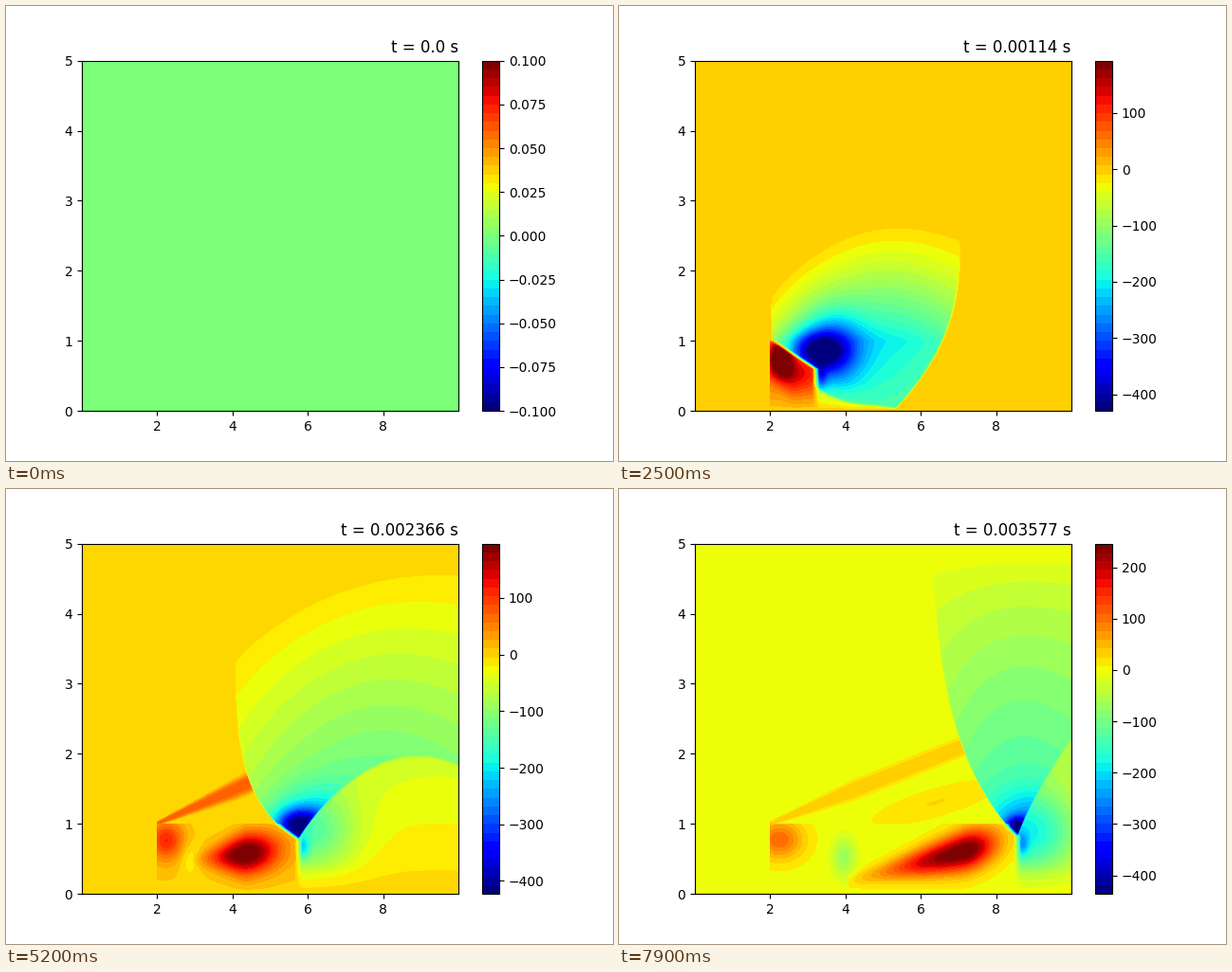
Animation, 640 px wide and 480 px high, one loop 8 s. Source, as a matplotlib script:

```python
import numpy as np
import matplotlib.pyplot as plt
from matplotlib.animation import FuncAnimation

FRAMES = 80
BANDS = 40
START = .327  # ms, the shock reaches the step
STEP_X = 2

# Simulation clock (ms) and colour limits at a few moments
MOMENT = [0, 8, 19, 32, 42, 52, 68, 79]
CLOCK = [0, .365, .868, 1.457, 1.912, 2.366, 3.085, 3.577]
LOW = [-350, -350, -438, -420, -502, -423, -388, -436]
HIGH = [10, 10, 103, 298, 345, 196, 215, 246]

x = (.01 + 9.98 * (np.arange(397) + .5) / 397)[None, :]
y = (5 * (np.arange(370) + .5) / 370)[:, None]


def ramp(q, a=0, b=1):
    """Rise from 0 at a to 1 at b."""
    return np.clip((q - a) / (b - a), 0, 1)


def pulse(q, centre, width):
    return np.exp(-((q - centre) / width) ** 2)


def gauss(cx, cy, sx, sy, amp):
    return amp * pulse(x, cx, sx) * pulse(y, cy, sy)


def vortex(t):
    age = t - START
    tx = max(2 + 1.5 * age, 4.7 + 2.32 * (t - 1.912))
    ty = .82 - .32 * pulse(t, 1.5, .6)
    return tx, ty


def trailing_edge(t, tx, ty):
    """Left end of the expansion: its x high up, and its x for every y."""
    far = max(2, 1.75 * t - .1)
    near = max(2, 2.88 + 2.53 * (t - 1.457))
    reach = .6 + .65 * max(0, t - 2.366)
    upper = far + (near - far) * np.exp(-np.maximum(y - 1, 0) / reach)
    lower = np.interp(y, [ty, 1], [tx, near])
    return far, np.where(y > 1, upper, lower)


def expansion(t, left, right):
    """Downward flow that grows from the arched top towards the step level."""
    age = t - START
    u = ramp(x, left, max(right, left + .05))
    rim = np.clip(1.5 * t - .05, 1, 4.7)
    peak = max(rim, min(4.8, 1 + 2.3 * age - .23 * age ** 2))
    turn = max(1.6, 2.7 - .5 * t)
    top = rim + (peak - rim) * np.sin(turn * u ** .8)
    depth = np.clip((top - y) / np.maximum(top - 1, .05), 0, 1)
    swell = 35 + 90 * np.exp(-(t - .868) / .8)
    amp = 75 + 60 * u + swell * np.sin(np.pi * u)
    return -amp * depth ** (1.45 - .2 * t) * np.minimum(1, .75 + .25 * y)


def reflection(t, tx, ty):
    """Height of the wave thrown back by the ground."""
    w = ramp(x, tx, max(tx + .1, 7.55 + 6.5 * (t - 1.457)))
    peak = .7 + 1.45 * (t - 1.457)
    arc = ty * (1 - w ** 3) + (peak - ty) * np.sin(np.pi * w ** .85)
    return np.maximum(arc * ramp(t, .85, 1.35), .02), w


def ahead(t, low, tx, ty, left):
    age = t - START
    shock = 2 + 6.25 * age
    core_w = min(.9 * age, .75 - .22 * (t - 1.457))
    halo = gauss(tx + .4, .85, min(age, 1.1), min(.9 * age, .55), -150)
    halo = halo * ramp(y, 0, .4)
    size = min(.3 * age, .17)
    blob = gauss(tx + .12, ty - .12, size, size, -90)
    core = gauss(tx, ty + .07 + .25 * core_w, core_w, .3 * core_w + .05, low / 2)

    upper = expansion(t, left, min(shock, 9.99)) + halo + core
    arc, w = reflection(t, tx, ty)
    lower = halo * ramp(t, 1, 3) - 55 * (1 - .4 * w) * np.minimum(y / arc, 1)
    under = ramp(arc - y, -.02, .02) * (x > tx - .1)
    v = upper * (1 - under) + lower * under + blob

    bend = (2.1 - .4 * age) * np.clip(1 - y / (1 + 1.8 * age), 0, 1) ** 2.5
    return v * ramp(shock - bend - x, 0, .07) * ramp(y, 0, .05)


def base_flow(t, high, tx):
    """Recirculation and hot wake below the step level."""
    cx, cy = max(2.6, tx - 1.4), .5 + .03 * t
    x0 = max(2, 2.6 + .9 * (t - 1.95))
    span = max(.4, .65 * (cx - x0))
    tilt = .14 * ramp(t, 1.9, 2.9)
    thick = .29 * (.35 + .65 * ramp(x, x0, cx))
    wake = (1.1 * high * ramp(t, .9, 1.4) * ramp(x, x0 - .05, x0 + .05)
            * pulse(x, cx, np.where(x < cx, span, .85))
            * pulse(y, cy + tilt * (x - cx), thick))
    fill = 80 * pulse(t, 1.5, .6) - 150 * pulse(t, .6, .35)
    corner = (110 + 120 * pulse(t, 1.2, .4)) * ramp(t, START, START + .5)
    v = (wake + fill * 4 * y * (1 - y)
         + gauss(2.25, .77, .2 + .12 * t, .28, corner)
         + gauss(x0 - .1, .52, .3, .27, -70 * ramp(t, 2, 2.8)))
    return v * ramp(y, 0, .08)


def oblique_waves(t):
    run = np.maximum(x - STEP_X, 0)
    amp = 100 * ramp(t, 1.2, 1.9) * np.exp(-(t - 1.9) / 1.7)
    off = y - 1 - (.28 - .018 * t) * run
    main = amp * np.exp(-(off / np.minimum(.03 + .05 * run, .14)) ** 4)
    weak = 27 * ramp(t, 2.8, 3.6) * pulse(y, 1.3 + .15 * (x - 6.4), .2)
    return main + weak * pulse(x, 6.4, 1.6)


def field(t, low, high):
    if t < START:
        return np.zeros((y.size, x.size))
    tx, ty = vortex(t)
    left, edge = trailing_edge(t, tx, ty)
    soft = np.where(y < 1, .1, .02)
    mix = ramp((x - edge) / soft, -1, 1)
    behind = np.where(y < 1, base_flow(t, high, tx), oblique_waves(t))
    v = ahead(t, low, tx, ty, left) * mix + behind * (1 - mix)
    return v * (x >= STEP_X)


norm = plt.Normalize(-.1, .1)
fig, ax = plt.subplots(figsize=(6.4, 4.8), dpi=100)
im = ax.imshow(np.zeros((y.size, x.size)), cmap="jet", norm=norm,
               extent=(.01, 9.99, 0, 5), origin="lower", aspect="auto",
               interpolation="nearest")
banded = plt.cm.ScalarMappable(norm, plt.get_cmap("jet", BANDS))
fig.colorbar(banded, ax=ax)
title = ax.set_title("", loc="right")


def update(n):
    t, low, high = (np.interp(n, MOMENT, row) for row in (CLOCK, LOW, HIGH))
    v = field(t, low, high)
    if not v.any():
        low, high = -.1, .1
    band = (high - low) / BANDS
    im.set_data(np.clip(np.round(v / band) * band, low, high))
    banded.set_clim(low, high)
    title.set_text(f"t = {round(float(t) / 1000, 6)} s")
    return im, title


anim = FuncAnimation(fig, update, frames=FRAMES, interval=100, repeat=True)
plt.show()
```
